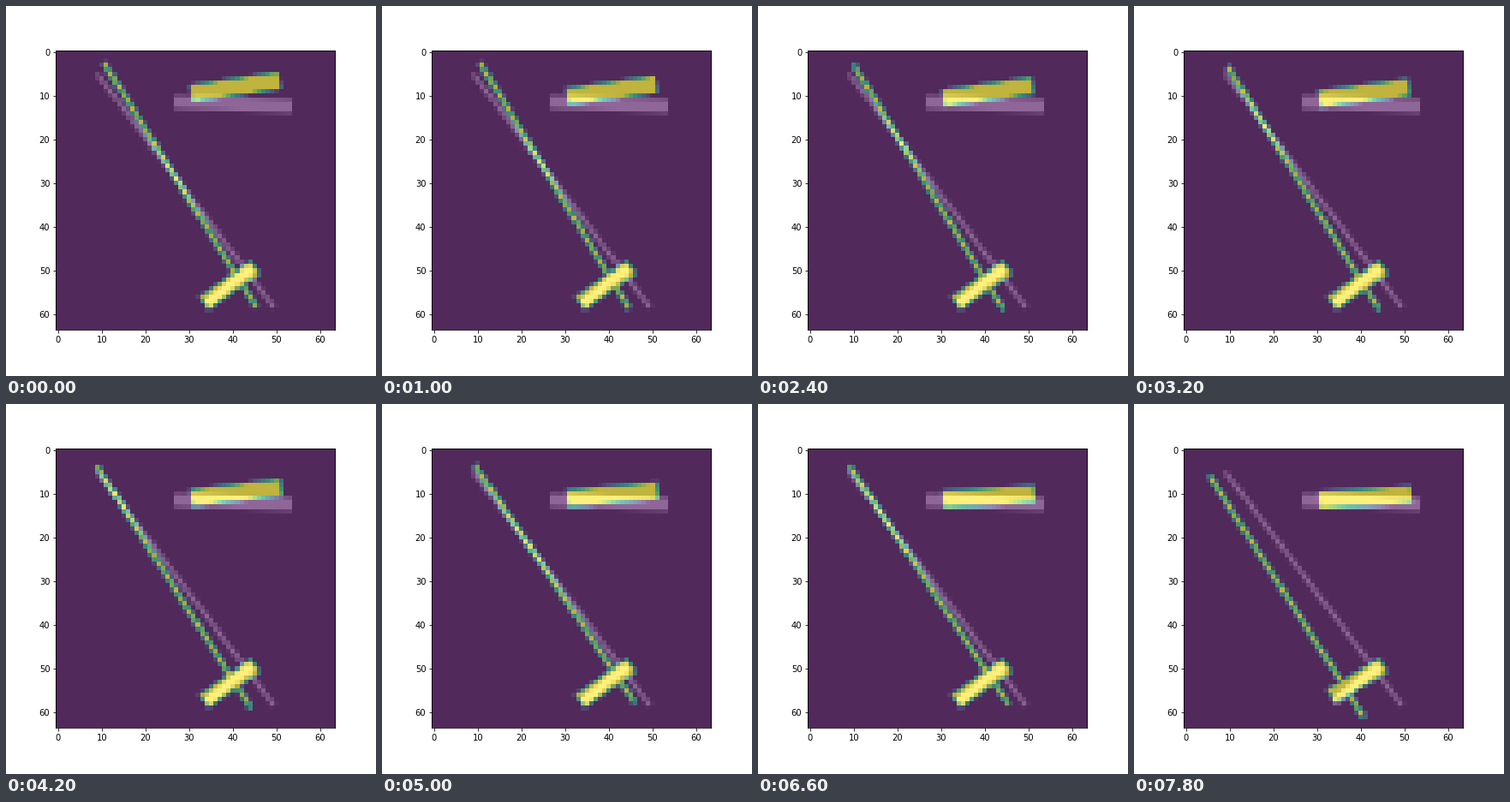
Animation of 432 by 432 pixels, one loop 8 s. Source, as a matplotlib script:

```python
import numpy as np
import matplotlib.pyplot as plt
from matplotlib.animation import FuncAnimation

SIZE = 64
FRAMES = 40

# Drift over time: sideways shift of the line's two ends, drop of the bar's right end
KEYS = [0, 5, 12, 21, 28, 33, 39]
HEAD = [0, 0, -0.6, -1.7, -1.0, -1.6, -5.3]
FOOT = [0, -0.7, -1.1, -1.2, 2.1, 0.1, -4.6]
DROP = [0, 0.9, 1.2, 2.1, 3.4, 3.6, 3.75]

rows, cols = np.mgrid[0:SIZE, 0:SIZE]


def segment(x0, y0, x1, y1, width):
    """Soft-edged coverage of a flat-capped stroke, in cell coordinates."""
    dx, dy = x1 - x0, y1 - y0
    length = np.hypot(dx, dy)
    ox, oy = cols - (x0 + x1) / 2, rows - (y0 + y1) / 2
    along = np.abs(ox * dx + oy * dy) / length
    across = np.abs(ox * dy - oy * dx) / length
    return (np.clip(width / 2 + 0.5 - across, 0, 1)
            * np.clip(length / 2 + 0.5 - along, 0, 1))


def goal():
    return np.maximum.reduce([
        segment(9, 5, 49.4, 58.4, 0.95),
        segment(26.5, 11.5, 53.5, 12.4, 3),
        segment(33.8, 57.8, 44.3, 49.2, 2.2),
    ])


def fit(i):
    u = i / (FRAMES - 1)
    head, foot, drop = (np.interp(i, KEYS, v) for v in (HEAD, FOOT, DROP))
    slide = max(0, (i - 33) / 6)
    return np.maximum.reduce([
        # both ends move at right angles to the line
        segment(10.6 + head, 2.6 - 0.6 * head,
                45.3 + foot, 58.3 - 0.6 * foot, 1.1),
        segment(30.5, 9.5 + 2 * np.sqrt(u), 50.6 + 0.9 * u, 6.5 + drop, 4),
        segment(33.3 - 0.2 * slide, 57.5 - 1.2 * slide, 45.2, 49.2, 3.7),
    ])


plt.rcParams.update({"font.family": "DejaVu Sans", "font.size": 10})
fig = plt.figure(figsize=(6, 6), dpi=72, facecolor="white")
fig.subplots_adjust(left=0.125, right=0.9, bottom=0.125, top=0.88)
ax = fig.add_subplot()
style = dict(vmin=0, vmax=1, alpha=0.6, interpolation="nearest")
ax.imshow(goal(), cmap="gray", **style)
guess = ax.imshow(fit(0), cmap="viridis", **style)
ax.set_xticks(range(0, SIZE, 10))
ax.set_yticks(range(0, SIZE, 10))


def update(i):
    guess.set_data(fit(i))
    return [guess]


anim = FuncAnimation(fig, update, frames=FRAMES, interval=200,
                     repeat=True, repeat_delay=0, blit=False)
plt.show()
```
